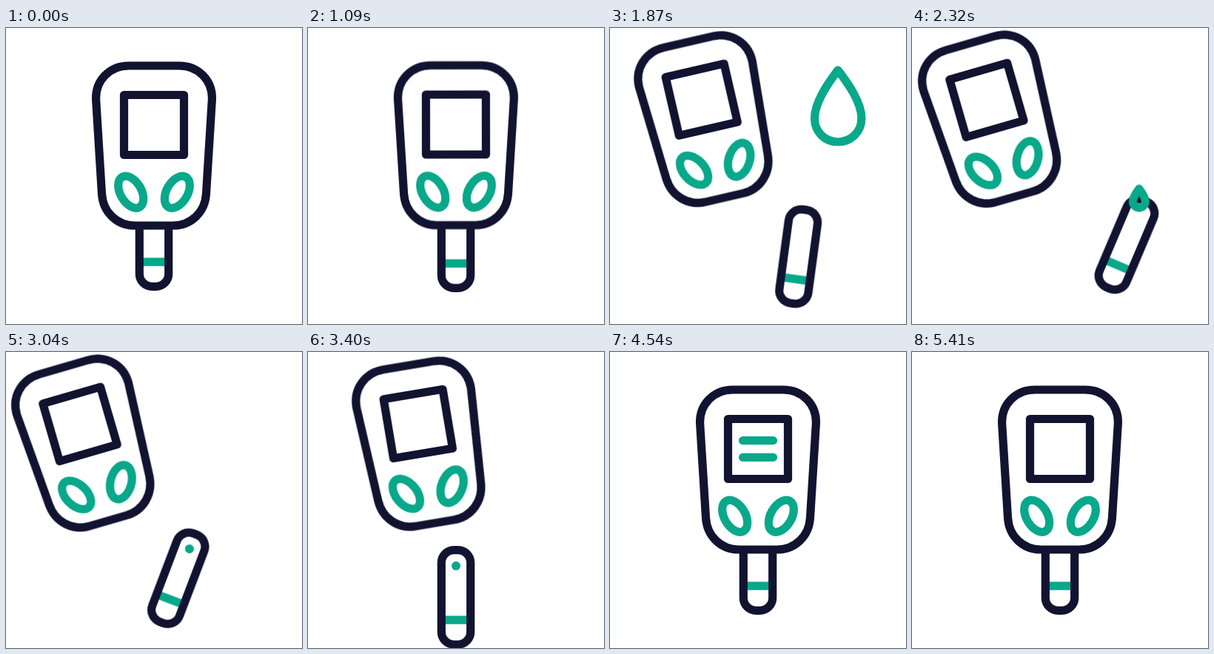
Write an HTML page without scripts that moves like this. It is 400 by 400 pixels and loops after 5.44 s.

```html
<!DOCTYPE html>
<html lang="en">
<head>
<meta charset="utf-8">
<title>Glucose meter</title>
<style>
  html, body { margin: 0; width: 100%; height: 100%; overflow: hidden; background: #fff; }
  svg { display: block; width: 100vw; height: 100vh; }

  .ink, .mint { fill: none; stroke-width: 11.2; stroke-linejoin: round; }
  .ink { stroke: #121331; }
  .mint { stroke: #08a88a; }
  .body { fill: #fff; }

  .a { animation: 5440ms cubic-bezier(.33, 0, .67, 1) infinite; }

  /* whole device: small push when the strip clicks in */
  .bump { animation-name: bump; }
  @keyframes bump {
    0%, 68.01% { transform: translateY(0); }
    71.32% { transform: translateY(-1.7px); }
    81.25%, 100% { transform: translateY(0); }
  }

  /* meter: swings up and left along a curve, then back */
  .swing {
    offset-path: path("M0 0C-3 -18 -10 -29.5 -29 -32.2C-52 -35 -75 -34.5 -100 -33.6");
    offset-rotate: 0deg;
    animation-name: swing;
  }
  @keyframes swing {
    0% { offset-distance: 0%; }
    19.3% { offset-distance: 0%; animation-timing-function: cubic-bezier(.27, 0, .41, 1); }
    44.85%, 56.03% { offset-distance: 100%; }
    70.74%, 100% { offset-distance: 0%; }
  }
  .tilt { transform-origin: 200px 131px; animation-name: tilt; }
  @keyframes tilt {
    0% { transform: rotate(0deg); }
    19.3% { transform: rotate(0deg); animation-timing-function: cubic-bezier(.27, 0, .41, 1); }
    44.85%, 56.03% { transform: rotate(-16.2deg); }
    70.74%, 100% { transform: rotate(0deg); }
  }

  /* strip: out, over to the drop, back under the meter, in */
  .strip-x { animation-name: strip-x; }
  @keyframes strip-x {
    0%, 26.29% { transform: translateX(0); }
    40.44%, 49.26% { transform: translateX(90px); }
    60.48%, 100% { transform: translateX(0); }
  }
  .strip-y { animation-name: strip-y; }
  @keyframes strip-y {
    0%, 18.93% { transform: translateY(0); }
    27.57% { transform: translateY(43px); }
    40.44%, 51.65% { transform: translateY(7px); }
    62.5%, 62.87% { transform: translateY(46px); }
    70.96%, 100% { transform: translateY(0); }
  }
  .strip-r { transform-origin: 200px 285.5px; animation-name: strip-r; }
  @keyframes strip-r {
    0%, 21.14% { transform: rotate(0deg); }
    27.76% { transform: rotate(-9.9deg); }
    40.44%, 54.41% { transform: rotate(23deg); }
    62.32%, 100% { transform: rotate(0deg); }
  }
  .dot { fill: #08a88a; animation-name: dot; animation-timing-function: step-end; }
  @keyframes dot {
    0% { opacity: 0; }
    44.6% { opacity: 1; }
    75% { opacity: 0; }
  }

  /* drop: grows, then falls and shrinks onto the strip */
  .fall { animation-name: fall; }
  @keyframes fall {
    0%, 38.24% { transform: translate(0, 0); }
    44.15%, 100% { transform: translate(-1.4px, 148px); }
  }
  .drop {
    transform-origin: 308px 105.5px;
    vector-effect: non-scaling-stroke;
    animation-name: size, show;
    animation-timing-function: cubic-bezier(.33, 0, .67, 1), step-end;
  }
  @keyframes size {
    0%, 20.22% { transform: scale(.01); }
    27.21%, 38.6% { transform: scale(1); }
    44.67%, 100% { transform: scale(.01); }
  }
  @keyframes show {
    0% { opacity: 0; }
    20.22% { opacity: 1; }
    44.67% { opacity: 0; }
  }

  /* reading on the screen */
  .row { stroke-linecap: round; stroke-dasharray: 41 99; }
  .one { animation-name: one; }
  .two { animation-name: two; }
  @keyframes one {
    0%, 68.5% { stroke-dashoffset: 43; }
    77.94%, 93.75% { stroke-dashoffset: 0; }
    99.26%, 100% { stroke-dashoffset: 43; }
  }
  @keyframes two {
    0%, 73.53% { stroke-dashoffset: 43; }
    83.46%, 91.18% { stroke-dashoffset: 0; }
    96.69%, 100% { stroke-dashoffset: 43; }
  }
</style>
</head>
<body>
<svg viewBox="0 0 400 400">
  <g class="a bump">
    <g class="a strip-x"><g class="a strip-y"><g class="a strip-r">
      <path class="mint" d="M181 316.2H219"/>
      <circle class="a dot" cx="200" cy="243" r="6"/>
      <rect class="ink" x="180.3" y="221.7" width="39.4" height="127.6" rx="17"/>
    </g></g></g>

    <g class="a swing"><g class="a tilt">
      <path class="ink body" d="M166 51H234C260 51 280 71 278.3 98L270.5 224C269 249 250 267 226 267H174C150 267 131 249 129.5 224L121.7 98C120 71 140 51 166 51Z"/>
      <rect class="ink" x="159.5" y="90.5" width="81" height="81"/>
      <ellipse class="mint" rx="14.2" ry="23.5" transform="translate(168.7 221.7) rotate(-30)"/>
      <ellipse class="mint" rx="14.2" ry="23.5" transform="translate(231.3 221.7) rotate(30)"/>
      <path class="a mint row one" d="M179.5 119.6h41"/>
      <path class="a mint row two" d="M179.5 142.4h41"/>
    </g></g>
  </g>

  <g class="a fall">
    <path class="a mint drop" d="M308 57C295 74 276.5 100 276.5 122C276.5 141 291 154 308 154C325 154 339.9 141 339.9 122C339.9 100 321 74 308 57Z"/>
  </g>
</svg>
</body>
</html>
```
